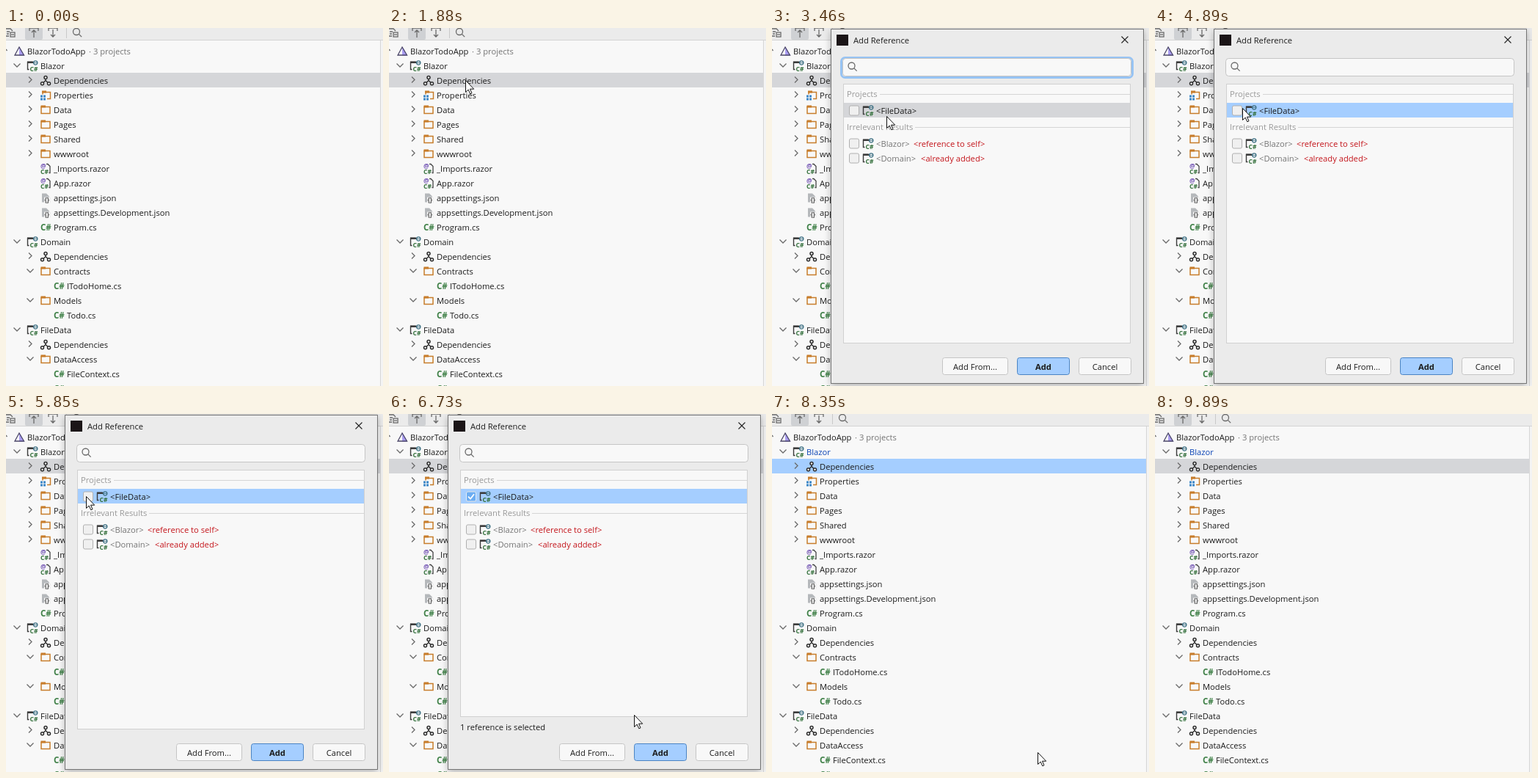
Recreate the animation shown at these times as an HTML page. Size 514x488 px, loop 9960 ms.

```html
<!DOCTYPE html>
<html lang="en">
<head>
<meta charset="utf-8">
<title>Add Reference</title>
<style>
html, body { margin: 0; width: 100%; height: 100%; overflow: hidden; background: #f8f8f8; }
svg { display: block; width: 100vw; height: 100vh; }
text { font: 11.2px "Open Sans", "Noto Sans", sans-serif; fill: #1c1c1c; white-space: pre; }
.bold { font-weight: 700; }
.code { font: 700 11.5px "Open Sans", sans-serif; fill: #3f8047; }
.tiny { font: 700 8.5px "Open Sans", sans-serif; fill: #34703c; }
.dim { fill: #747474; }
.label { fill: #999; }
.red { fill: #c4161c; }
.line { fill: none; stroke: #6a6a6a; stroke-width: 1.3; }
</style>
</head>
<body>
<svg id="stage" viewBox="0 0 514 488" xmlns="http://www.w3.org/2000/svg"></svg>
<script>
const LOOP = 9960;
const BLUE = '#a5ceff', GREY = '#d5d6d9';

const rect = (x, y, w, h, fill, more = '') =>
  `<rect x="${x}" y="${y}" width="${w}" height="${h}" fill="${fill}" ${more}/>`;
const path = (d, more = 'class="line"') => `<path d="${d}" ${more}/>`;
const text = (x, y, s, cls = '', more = '') =>
  `<text x="${x}" y="${y}" class="${cls}" ${more}>${s.replace(/</g, '&lt;').replace(/>/g, '&gt;')}</text>`;
const stroke = (color, w = 1) => `fill="none" stroke="${color}" stroke-width="${w}"`;
const at = (x, y, body) => `<g transform="translate(${x} ${y})">${body}</g>`;
const loupe = (x, y, r) => `<circle cx="${x}" cy="${y}" r="${r}" class="line"/>` +
  path(`M${x + r * .7} ${y + r * .7}l4 4`);

// Icons are drawn around the centre of a 14 px cell.
const icons = {
  solution: path('M0 -6L7 6H0Z', 'fill="#a99cf0"') + path('M0 -5.5L-6 5.5H6.5Z', stroke('#4a4668', 1.3)),
  project: path('M0 -5H-6.5V5H-4.5', stroke('#3c3c3c', 1.4)) + rect(-7, -6, 8, 2.5, '#3c3c3c') +
    `<circle cx="4.2" cy="-4" r="2.6" ${stroke('#3f7184', 1.4)}/>` +
    path('M2 -4H6.5', stroke('#3f7184', .8)) + text(-3.5, 7, 'C#', 'tiny'),
  deps: path('M0 -2V0L-4 4M0 0L4 4', stroke('#2c2c2c', 1.4)) +
    [[0, -4], [-4.5, 4.2], [4.5, 4.2]].map(([x, y]) =>
      `<circle cx="${x}" cy="${y}" r="2" fill="#fafafa" stroke="#2c2c2c" stroke-width="1.5"/>`).join(''),
  folder: rect(-6.5, -6, 6.5, 3, '#c77d2b') + path('M-6 -4H6V5H-6Z', stroke('#c77d2b', 1.5)),
  props: rect(-5, -6, 6, 3, '#c77d2b') + path('M-4 -1V-4H6.5V5H2', stroke('#c77d2b', 1.5)) +
    [[-7, 0], [-3, 0], [-7, 4], [-3, 4]].map(([x, y]) => rect(x, y, 3, 3, '#3d87c7')).join(''),
  razor: path('M1 -6H3L6 -3V6H4.5', stroke('#444', 1.3)) + text(-7, -.5, '@', 'tiny', 'style="fill:#7557b5"') +
    text(-7, 7, 'C#', 'tiny'),
  json: path('M-5 -6H1L5 -2V6H-5Z', 'fill="#b5b8bb"') + rect(-2, -1, 9, 8, '#f1f1f1') +
    text(-1.5, 5.5, '{}', 'tiny', 'style="fill:#555"'),
  cs: text(-7, 4.2, 'C#', 'code')
};
const chevron = (x, y, open) => path(open ? `M${x - 4.5} ${y - 3}l4.5 4.5 4.5 -4.5` : `M${x - 2} ${y - 5}l4 4 -4 4`);

// name, indent level, icon, chevron: 1 open, 0 closed, none
const rows = [
  ['BlazorTodoApp', 0, 'solution'],
  ['Blazor', 1, 'project', 1], ['Dependencies', 2, 'deps', 0], ['Properties', 2, 'props', 0],
  ['Data', 2, 'folder', 0], ['Pages', 2, 'folder', 0], ['Shared', 2, 'folder', 0], ['wwwroot', 2, 'folder', 0],
  ['_Imports.razor', 2, 'razor'], ['App.razor', 2, 'razor'],
  ['appsettings.json', 2, 'json'], ['appsettings.Development.json', 2, 'json'], ['Program.cs', 2, 'cs'],
  ['Domain', 1, 'project', 1], ['Dependencies', 2, 'deps', 0],
  ['Contracts', 2, 'folder', 1], ['ITodoHome.cs', 3, 'cs'],
  ['Models', 2, 'folder', 1], ['Todo.cs', 3, 'cs'],
  ['FileData', 1, 'project', 1], ['Dependencies', 2, 'deps', 0],
  ['DataAccess', 2, 'folder', 1], ['FileContext.cs', 3, 'cs'], ['TodoFileDAO.cs', 3, 'cs']
];

const tree = rows.map(([name, level, icon, open], i) => {
  const x = 29 + 18 * level, y = 31.5 + 20 * i;
  return at(x - 11, y, icons[icon]) + (open === undefined ? '' : chevron(x - 32, y, open)) +
    text(x, y + 4.5, name, '', i === 1 ? 'id="projectName"' : '');
}).join('') + text(113, 36, '· 3 projects', 'dim') + path('M0 29l1.5 2');

const toolbar = rect(0, 0, 514, 16, '#ebebeb') + rect(0, 16, 514, 1, '#d3d3d3') +
  rect(26, -4, 24, 20, '#cfd1d4', 'rx="2"') +
  path('M0 1H6L9 4M0 11H4M1 5H5M1 8H4') + rect(6, 6, 6, 6, 'none', 'class="line"') + path('M7 9H11') +
  path('M38 13V3M35 6l3 -3 3 3M32 4V0H44V4') + path('M64 2V12M61 9l3 3 3 -3M58 4V0H70V4') +
  rect(82, 0, 1, 14, '#c9c9c9') + loupe(96, 5, 4.5);

const button = (x, w, label, main) =>
  rect(x + .5, 449.5, w, 23, main ? BLUE : '#f8f8f8', `rx="3" stroke="${main ? '#4a84c4' : '#c5c5c5'}"`) +
  text(x + w / 2 + .5, 465.5, label, main ? 'bold' : '', 'text-anchor="middle"');
const checkbox = y => rect(105.5, y - 6.5, 13, 13, '#f0f0f0', 'rx="2" stroke="#b0b0b0"');
const entry = (y, name, note) => checkbox(y) + at(131, y, icons.project) +
  text(142, y + 4.5, name, note ? 'dim' : '') + (note ? text(name === '<Blazor>' ? 193 : 203, y + 4.5, note, 'red') : '');
const heading = (y, s, x) => text(102, y + 4, s, 'label') + rect(x, y, 488 - x, 1, '#d5d5d5');

const dialog = `<g id="dialog">` +
  rect(80.5, 1.5, 426, 483, '#ebebeb', 'stroke="#747474" filter="url(#shadow)"') +
  rect(88, 9, 16, 15, '#1b1517') + text(111, 20.5, 'Add Reference') +
  path('M476.5 11.5l9 9M485.5 11.5l-9 9', stroke('#222', 1.1)) +
  rect(94.5, 40.5, 397, 27, 'none', 'id="focusRing" rx="5" stroke="#97c3f3" stroke-width="3"') +
  rect(96.5, 41.5, 393, 24, '#f8f8f8', 'rx="4" stroke="#c5c5c5"') + loupe(108.5, 51.5, 4.5) +
  rect(126, 45, 1, 16, '#111', 'id="caret"') +
  rect(97.5, 76.5, 391, 353, '#f8f8f8', 'id="list" stroke="#d0d0d0"') +
  heading(90, 'Projects', 147) + rect(98, 102, 390, 20, BLUE, 'id="entryRow"') +
  entry(112.5, '<FileData>') +
  `<g id="tick">` + rect(105.5, 106, 13, 13, '#6cadf2', 'rx="2" stroke="#e3edf8"') +
  path('M108 112.5l3 3.2 5 -6.5', stroke('#fff', 1.8)) + `</g>` +
  heading(135, 'Irrelevant Results', 195) +
  entry(157.5, '<Blazor>', '<reference to self>') + entry(177.5, '<Domain>', '<already added>') +
  text(97, 431, '1 reference is selected', '', 'id="status"') +
  button(232, 89, 'Add From...') + button(334, 71, 'Add', true) + button(418, 71, 'Cancel') +
  rect(334.5, 449.5, 71, 23, 'none', 'id="pressRing" rx="3" stroke="#4f93e0" stroke-width="2.4"') + `</g>`;

const cursor = path('M.5 .5V16.5L4.2 13.1L6.8 18.8L9 17.8L6.5 12.2H11.7Z',
  'id="cursor" fill="#fff" stroke="#111" stroke-linejoin="round"');

const stage = document.getElementById('stage');
stage.innerHTML =
  `<defs><filter id="shadow" x="-10%" y="-10%" width="120%" height="120%">
    <feDropShadow dx="0" dy="3" stdDeviation="5" flood-opacity=".28"/></filter></defs>` +
  rect(0, 0, 514, 488, '#f8f8f8') + rect(0, 61, 510, 20, GREY, 'id="treeRow"') +
  tree + toolbar + rect(510, 17, 1, 471, '#d6d6d6') + rect(511, 17, 3, 471, '#f3f3f3') +
  dialog + cursor;

const el = {};
stage.querySelectorAll('[id]').forEach(n => el[n.id] = n);

// Pointer stops: time, x, y
const stops = [
  [900, 29, 131], [1340, 88, 81], [1690, 88, 81], [1880, 104, 71], [2700, 104, 71], [3100, 128, 82],
  [3170, 128, 82], [3720, 179, 151], [3740, 179, 151], [4490, 119, 109], [5300, 119, 109],
  [5850, 109, 112], [6470, 109, 112], [6730, 334, 410], [6880, 334, 410], [7200, 322, 440],
  [7610, 362, 461], [8900, 362, 461], [9160, 455, 489]
];
const clamp = v => Math.max(0, Math.min(1, v));
const ease = v => v * v * (3 - 2 * v);
const within = (t, a, b) => t >= a && t < b;
const show = (node, on) => node.setAttribute('visibility', on ? 'inherit' : 'hidden');

function pointer(t) {
  const i = stops.findIndex(s => s[0] > t);
  if (i < 1) return stops[i ? stops.length - 1 : 0].slice(1);
  const [a, x, y] = stops[i - 1], [b, u, v] = stops[i], k = ease((t - a) / (b - a));
  return [x + (u - x) * k, y + (v - y) * k];
}

function render(t) {
  el.treeRow.setAttribute('fill', within(t, 2010, 2410) || within(t, 8020, 9890) ? BLUE : GREY);
  el.projectName.style.fill = t >= 8350 ? '#0b44b5' : '';

  const open = Math.min(clamp((t - 3170) / 210), clamp((8350 - t) / 240));
  const scale = .94 + .06 * ease(open);
  show(el.dialog, open > 0);
  el.dialog.setAttribute('opacity', open);
  el.dialog.setAttribute('transform', `translate(293.5 243) scale(${scale}) translate(-293.5 -243)`);
  show(el.focusRing, t < 4890);
  show(el.caret, within(t, 3690, 4190) || within(t, 4690, 4890));
  el.entryRow.setAttribute('fill', within(t, 4890, 7820) ? BLUE : GREY);

  // The list gives up a strip at its foot for the status line.
  const picked = t >= 5920;
  show(el.tick, picked);
  show(el.status, picked);
  el.list.setAttribute('height', picked ? 336 : 353);
  show(el.pressRing, t >= 7820);

  const [x, y] = pointer(t);
  show(el.cursor, within(t, 940, 9160));
  el.cursor.setAttribute('transform', `translate(${Math.round(x)} ${Math.round(y)})`);
}

const start = performance.now();
function tick(now) {
  render(Math.max(0, now - start) % LOOP);
  requestAnimationFrame(tick);
}
render(0);
requestAnimationFrame(tick);
</script>
</body>
</html>
```
